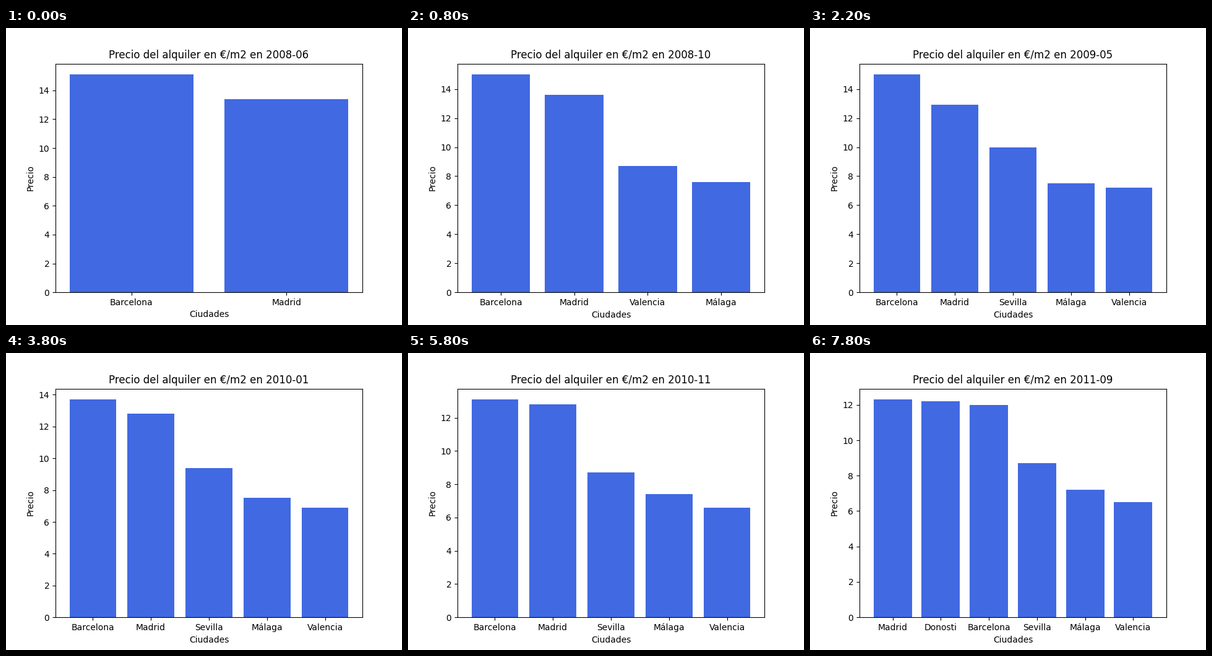
A matplotlib script that plays this animation: 640 by 480 pixels, repeating every 8 s.

```python
import matplotlib.pyplot as plt
import numpy as np
from matplotlib.animation import FuncAnimation

STEP_MS = 200
MONTHS = 40
START = 2008 * 12 + 5  # June 2008, counted in months

# Turning points (month, price) of each trend; a city joins at its first one
TRENDS = {
    "Barcelona": [(0, 15.06), (11, 15), (19, 13.7), (29, 13.1), (39, 12.04)],
    "Donosti": [(32, 12.6), (39, 12.2)],
    "Madrid": [(0, 13.4), (4, 13.6), (11, 12.86), (29, 12.8), (34, 12.4), (39, 12.3)],
    "Sevilla": [(8, 10.2), (29, 8.72), (34, 8.8), (39, 8.7)],
    "Valencia": [(2, 8.8), (4, 8.7), (11, 7.2), (29, 6.62), (39, 6.5)],
    "Málaga": [(3, 7.6), (34, 7.4), (39, 7.2)],
}

fig, ax = plt.subplots(figsize=(6.4, 4.8), dpi=100)


def price(city, month):
    """Price on the straight line between turning points, to one decimal."""
    return round(float(np.interp(month, *zip(*TRENDS[city]))), 1)


def ranking(month):
    """Cities present in the given month with their prices, dearest first."""
    present = [city for city, points in TRENDS.items() if month >= points[0][0]]
    rows = [(city, price(city, month)) for city in present]
    return sorted(rows, key=lambda row: -row[1])


def draw(month):
    ax.clear()
    cities, prices = zip(*ranking(month))
    ax.bar(cities, prices, color="royalblue")
    year, index = divmod(START + month, 12)
    ax.set_title(f"Precio del alquiler en €/m2 en {year}-{index + 1:02d}")
    ax.set_xlabel("Ciudades")
    ax.set_ylabel("Precio")
    return ax.patches


anim = FuncAnimation(fig, draw, frames=MONTHS, interval=STEP_MS,
                     repeat=True, repeat_delay=0, blit=False)
plt.show()
```
